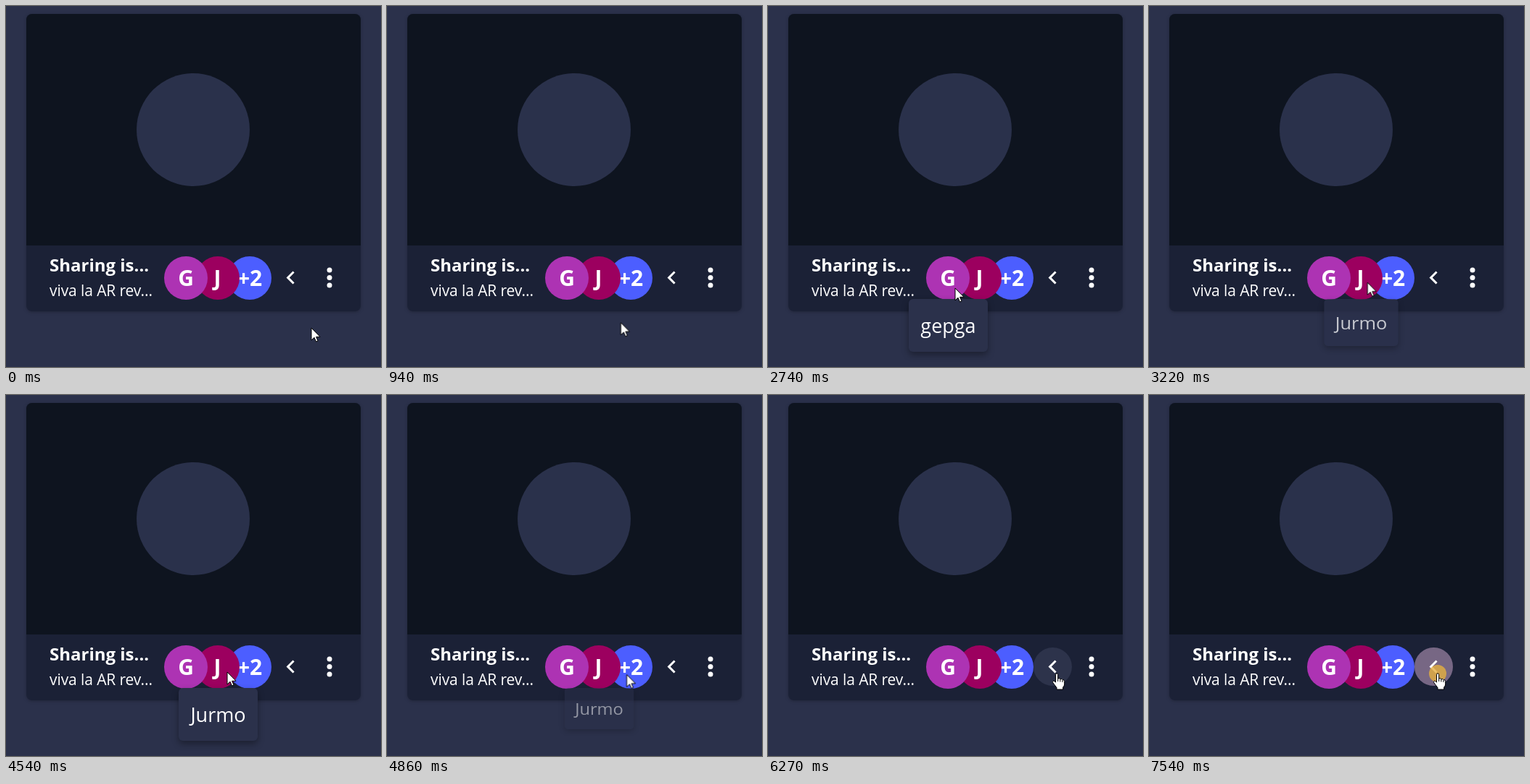
Animation, 517 px wide and 499 px high, one loop 8000 ms. Source, as an HTML page:

```html
<!DOCTYPE html>
<html lang="en">
<head>
<meta charset="utf-8">
<title>Room card with avatar tooltips</title>
<style>
  html, body { margin: 0; width: 100%; height: 100%; overflow: hidden; background: #2b314b; }
  svg { display: block; width: 517px; height: 499px; font-family: "Open Sans", sans-serif; fill: #fff; }
  .title { font-size: 24px; font-weight: 700; }
  .subtitle { font-size: 21px; letter-spacing: -.1px; }
  .avatars text { font-size: 30px; font-weight: 700; text-anchor: middle; }
  .card { filter: drop-shadow(0 1px 2px rgb(0 0 0 / .25)); }

  .tip text { font-size: 27px; text-anchor: middle; }
  .tip rect { fill: #2b314b; filter: drop-shadow(0 4px 5px rgb(0 0 0 / .36)); }

  .tip, .pointer, .arrow, .hand, .hover, .ripple, .press { animation: 8s linear infinite; }
  .first { transform-origin: 248.5px 405px; animation-name: first-tip; }
  .second { transform-origin: 292.5px 405px; animation-name: second-tip; }
  .pointer { animation-name: move; }
  .arrow { animation-name: arrow; animation-timing-function: step-end; }
  .hand { animation-name: hand; animation-timing-function: step-end; }
  .hover { animation-name: hover; }
  .ripple { transform-origin: 392.5px 375.5px; animation-name: ripple; }
  .press { animation-name: press; animation-timing-function: step-end; }

  @keyframes move {
    0% { transform: translate(421px, 445px); }
    5.75% { transform: translate(421px, 445px); animation-timing-function: steps(5, jump-start); }
    10.69% { transform: translate(350px, 446px); animation-timing-function: steps(6, jump-start); }
    16.625% { transform: translate(267px, 421px); animation-timing-function: steps(4, jump-start); }
    20.625% { transform: translate(252px, 402px); animation-timing-function: steps(3, jump-start); }
    23.625% { transform: translate(254px, 380px); animation-timing-function: steps(3, jump-start); }
    26.625% { transform: translate(251px, 392px); }
    31.375% { transform: translate(251px, 392px); animation-timing-function: steps(2, jump-start); }
    33.375% { transform: translate(258px, 390px); }
    35.25% { transform: translate(258px, 390px); animation-timing-function: steps(3, jump-start); }
    38.25% { transform: translate(290px, 380px); animation-timing-function: steps(4, jump-start); }
    42.25% { transform: translate(305px, 383px); }
    57.725% { transform: translate(305px, 383px); animation-timing-function: steps(2, jump-start); }
    59.7% { transform: translate(320px, 381px); animation-timing-function: steps(4, jump-start); }
    63.625% { transform: translate(341px, 392px); }
    71.5% { transform: translate(341px, 392px); animation-timing-function: steps(1, jump-start); }
    72.4875% { transform: translate(354px, 386px); animation-timing-function: steps(3, jump-start); }
    75.4375% { transform: translate(385px, 386px); animation-timing-function: steps(4, jump-start); }
    79.3625%, 100% { transform: translate(398px, 385px); }
  }
  @keyframes first-tip {
    0% { opacity: 0; transform: scale(.75, .5625); }
    18.625% { opacity: 0; transform: scale(.75, .5625); animation-timing-function: steps(2, jump-start); }
    20.625% { opacity: .5; transform: scale(.93, .88); animation-timing-function: steps(3, jump-start); }
    23.625% { opacity: 1; transform: none; }
    36.25% { opacity: 1; transform: none; animation-timing-function: steps(3, jump-start); }
    39.25%, 100% { opacity: 0; transform: scale(.75, .5625); }
  }
  @keyframes second-tip {
    0% { opacity: 0; transform: scale(.75, .5625); }
    38.25% { opacity: 0; transform: scale(.75, .5625); animation-timing-function: steps(4, jump-start); }
    42.25% { opacity: 1; transform: none; }
    59.7% { opacity: 1; transform: none; animation-timing-function: steps(4, jump-start); }
    63.625%, 100% { opacity: 0; transform: scale(.75, .5625); }
  }
  @keyframes arrow { 0% { opacity: 1; } 73.45%, 100% { opacity: 0; } }
  @keyframes hand { 0% { opacity: 0; } 73.45%, 100% { opacity: 1; } }
  @keyframes hover {
    0% { opacity: 0; }
    73.45% { opacity: 0; animation-timing-function: steps(2, jump-start); }
    75.4375%, 100% { opacity: 1; }
  }
  @keyframes ripple {
    0% { opacity: 0; transform: scale(0); }
    87.125% { opacity: .33; transform: scale(0); animation-timing-function: steps(8, jump-start); }
    95.2%, 100% { opacity: 1; transform: none; }
  }
  @keyframes press { 0% { opacity: 0; } 87.125%, 100% { opacity: .8; } }
</style>
</head>
<body>
<svg viewBox="0 0 517 499">
  <g class="card">
    <rect x="28" y="11" width="461" height="411" rx="8" fill="#1b2136"/>
    <path d="M28 331V19a8 8 0 0 1 8-8H481a8 8 0 0 1 8 8V331z" fill="#0e141f"/>
  </g>
  <circle cx="258" cy="171" r="78" fill="#2a314b"/>

  <text class="title" x="60" y="367">Sharing is...</text>
  <text class="subtitle" x="60" y="401">viva la AR rev...</text>

  <g class="avatars">
    <circle cx="336" cy="376" r="30" fill="#4c5eff"/>
    <text x="336" y="387">+2</text>
    <circle cx="292" cy="376" r="30" fill="#9c005f"/>
    <text x="291.4" y="387">J</text>
    <circle cx="248" cy="376" r="30" fill="#ad33b3"/>
    <text x="248" y="387">G</text>
  </g>

  <circle class="hover" cx="392.5" cy="375.5" r="26.5" fill="#2d334b"/>
  <circle class="ripple" cx="392.5" cy="375.5" r="26.5" fill="#776784"/>
  <path transform="translate(374.5 357.5) scale(1.5)" d="M15.41 7.41 14 6l-6 6 6 6 1.41-1.41L10.83 12z"/>
  <circle cx="446" cy="365" r="3.5"/>
  <circle cx="446" cy="375.5" r="3.5"/>
  <circle cx="446" cy="386" r="3.5"/>

  <g class="tip first">
    <rect x="194" y="405" width="109" height="73" rx="6"/>
    <text x="248.5" y="452">gepga</text>
  </g>
  <g class="tip second">
    <rect x="238" y="405" width="109" height="73" rx="6"/>
    <text x="292.5" y="452">Jurmo</text>
  </g>

  <circle class="press" cx="398" cy="385" r="12" fill="#e6b040"/>
  <g class="pointer" stroke="#000" stroke-linejoin="round">
    <path class="arrow" d="M0 0V17L4 13.2 6.5 19 9 18 6.6 12.3H12z"/>
    <g class="hand">
      <path d="M-1.5 12V1.5a1.6 1.6 0 0 1 3.2 0V7q2.9-1 3.2.8 2.9-.8 3.2.9 2.6-.4 2.6 1.8V15q0 2-2 4v3H0v-2.5L-5 13q-1.2-2 .5-2.8 1.4-.4 3 2z"/>
      <path fill="none" d="M1.7 7v4M4.9 8v3.5M8 9v3"/>
    </g>
  </g>
</svg>
</body>
</html>
```
